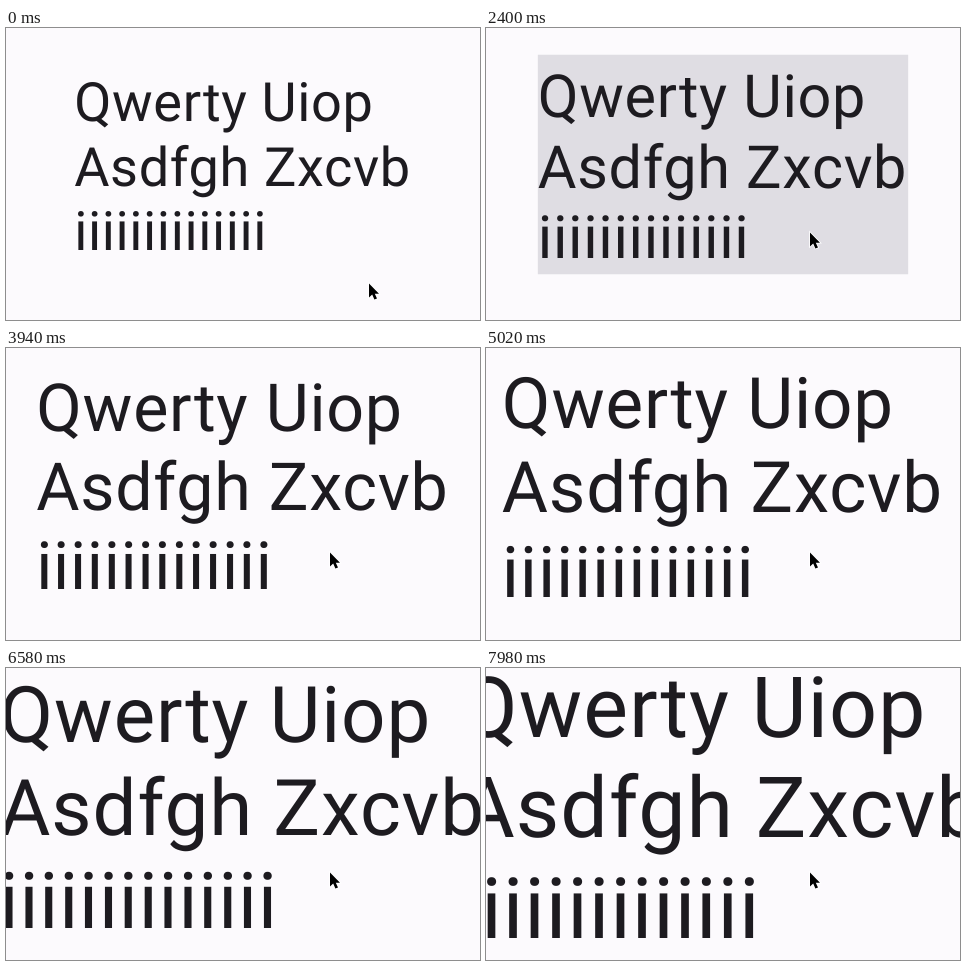
Recreate the animation shown at these times as an HTML page. Size 474 by 292 pixels, loop 8 s.

```html
<!DOCTYPE html>
<html lang="en">
<head>
<meta charset="utf-8">
<title>Growing text</title>
<style>
  html, body { margin: 0; width: 100%; height: 100%; overflow: hidden; background: #fcfafd; }
  svg { display: block; width: 474px; height: 292px; }
  text { font: 100px Roboto, sans-serif; letter-spacing: 1.15px; fill: #1d1b20; text-rendering: geometricPrecision; }
</style>
</head>
<body>
<svg viewBox="0 0 474 292">
  <defs>
    <radialGradient id="ink">
      <stop offset=".7" stop-color="#bab9be"/>
      <stop offset=".84" stop-color="#cfccd2"/>
      <stop offset="1" stop-color="#dfdde3" stop-opacity="0"/>
    </radialGradient>
    <clipPath id="clip"><rect id="clipBox"/></clipPath>
  </defs>
  <rect id="box" fill="#dfdde3"/>
  <g clip-path="url(#clip)"><circle id="splash" fill="url(#ink)"/></g>
  <g id="label">
    <text x="-312" y="-80">Qwerty Uiop</text>
    <text x="-312" y="39">Asdfgh Zxcvb</text>
    <text x="-312" y="158">iiiiiiiiiiiiii</text>
  </g>
  <path id="cursor" d="M0 0V14L3.2 11L5.4 16L8 15L5.8 10.2H10Z" fill="#000" stroke="#fff" stroke-width="1.6" paint-order="stroke"/>
</svg>
<script>
  const LOOP = 8000, PRESS = 27, CX = 237, CY = 136.5;
  const $ = id => document.getElementById(id);
  const clamp = v => Math.min(1, Math.max(0, v));
  const mix = (a, b, k) => a + (b - a) * k;
  const set = (id, attrs) => {
    for (const key in attrs) $(id).setAttribute(key, attrs[key]);
  };

  // Steps last 20, 100 and 20 ms in turn.
  const stepAt = ms => {
    const phase = ms % 140;
    return 3 * Math.floor(ms / 140) + (phase >= 120 ? 2 : phase >= 20 ? 1 : 0);
  };

  function draw(ms) {
    const n = stepAt(ms);
    const size = 54.1 + 0.21 * Math.max(0, n - PRESS);
    set('label', { transform: `translate(${CX} ${CY}) scale(${size / 100})` });

    const w = 3.12 * size, h = 1.72 * size + 7.7;
    const area = { x: CX - w, y: CY - h, width: 2 * w, height: 2 * h };
    set('box', { ...area, opacity: clamp((n - PRESS + 1) / 4) * clamp((77 - n) / 5) });
    set('clipBox', area);

    const p = Math.max(0, (n - PRESS) / 16);
    const k = clamp(p * 1.15);
    set('splash', {
      cx: mix(324, CX, k),
      cy: mix(204, CY, k),
      r: 296 * p,
      opacity: clamp((50 - n) / 12)
    });

    const m = clamp(n / 21);
    set('cursor', { transform: `translate(${mix(363, 324, m)} ${mix(255.5, 204.5, m)})` });
  }

  const start = performance.now();
  function tick() {
    draw((performance.now() - start) % LOOP);
    requestAnimationFrame(tick);
  }
  tick();
</script>
</body>
</html>
```
